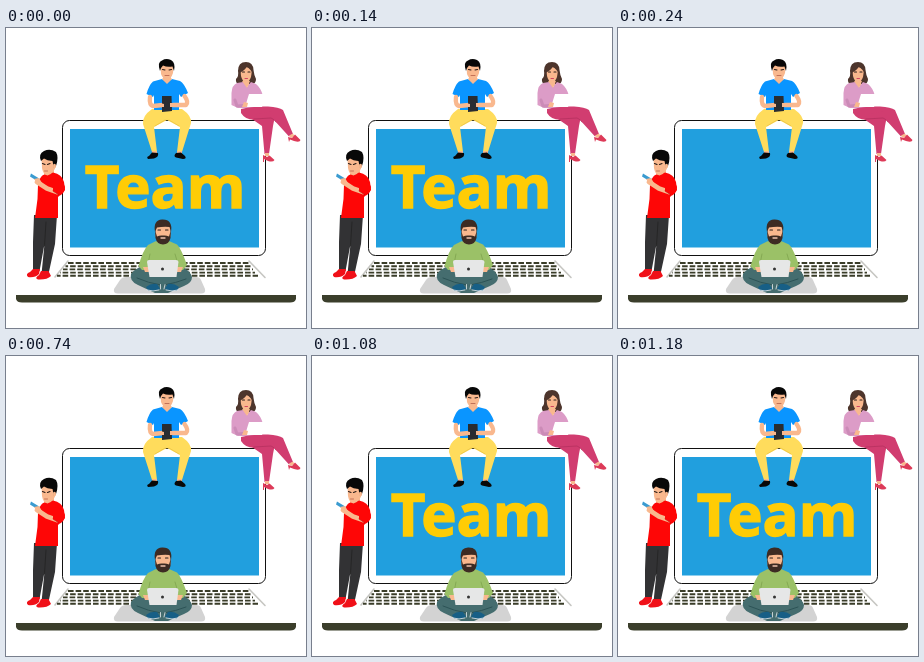
An HTML page for the animation above (1.24 s loop, 300 px wide and 300 px high).

```html
<!DOCTYPE html>
<html lang="en">
<head>
<meta charset="utf-8">
<title>Team</title>
<style>
  html, body { margin: 0; width: 100%; height: 100%; overflow: hidden; background: #fff; }
  svg { display: block; width: 100%; height: 100%; }
  .word {
    font: 700 59.8px "Open Sans", "Noto Sans", sans-serif;
    fill: #ffcc05;
    stroke: #ffcc05;
    stroke-width: 1.4;
    text-anchor: middle;
    animation: blink 1240ms step-end infinite;
  }
  @keyframes blink {
    0% { visibility: visible; }
    19.3548% { visibility: hidden; }
    87.0968%, 100% { visibility: visible; }
  }
  .skin { fill: #f9b88e; }
  .ink { fill: #080808; }
  .line { fill: none; stroke-linecap: round; stroke-linejoin: round; }
  .arm { stroke: #f9b88e; }
  .brow { stroke: #2b1d18; stroke-width: 1.1; }
  .mouth { stroke: #b5604a; stroke-width: .8; }
  .keys path { fill: none; stroke: #3a3d29; stroke-width: 1.9; stroke-dasharray: 5.6 2; }
</style>
</head>
<body>
<svg viewBox="0 0 300 300">
  <g id="laptop">
    <rect x="56.5" y="92.5" width="203" height="135" rx="7" fill="#fff" stroke="#111"/>
    <rect x="64" y="101" width="189" height="118.5" fill="#219fde"/>
    <path class="line" d="M62 233L49 249M243 233L259 249.5" stroke="#c6c6c2" stroke-width="1.6"/>
    <g class="keys">
      <path d="M62 235H243"/>
      <path d="M59.5 238.2H245" stroke-dashoffset="3"/>
      <path d="M57 241.4H247" stroke-dashoffset="1"/>
      <path d="M54 244.6H249" stroke-dashoffset="5"/>
      <path d="M51 247.8H252" stroke-dashoffset="2"/>
    </g>
    <path d="M120 249H190Q194 249 195 252L199 261Q200 265.500 195 265.500H112Q107 265.500 108 261L114 252Q116 249 120 249Z" fill="#d3d3d3"/>
    <path d="M10 267H290V271Q289 274.500 284 274.500H16Q11 274.500 10 271Z" fill="#3b3e2b"/>
  </g>

  <text class="word" x="159.1" y="179.700">Team</text>

  <g id="reader">
    <path d="M146 81H176Q186 88 185 95L176 124H171L174 99L161 92L148 99L151 124H146L137 96Q136 88 146 81Z" fill="#ffdc5c"/>
    <path class="line" d="M149 98L159 92M173 98L163 92" stroke="#e5bd3c" stroke-width=".6"/>
    <path class="skin" d="M146 123H151V126H146ZM171 123H176V126H171Z"/>
    <path class="ink" d="M146 124.500L152 125Q153 129 148 130.500L142 131Q140 129 143 128ZM170 125L175 124.500L179 128Q181 131 177 131L170 129.500Q167 128 170 125Z"/>
    <path class="skin" d="M157 45H165V54H157Z"/>
    <path d="M156 51L161 55L166 51L174 53Q178 55 182 65L175 69L173 66V82H148V67L147 69L140.500 66Q143 57 147 53.500Z" fill="#0a95ff"/>
    <path class="skin" d="M156 51L161 56L166 51L164 49H158Z"/>
    <path class="line arm" d="M144 69Q143 77 147 78L157 77M178.500 68Q183 74 180 77L167 77" stroke-width="4.400"/>
    <path d="M156 68H165.500L166 83L156 84Z" fill="#292c31"/>
    <path class="skin" d="M154 75L158 76V79H154ZM164 75H168V79H164Z"/>
    <path class="skin" d="M154.500 38Q157 34 161 34Q167 35 167.500 40L167 45Q165 51.500 161 51.500Q157 51.500 155 46Z"/>
    <path class="ink" d="M154 43Q151 34 156 32.500Q160 30 165 32Q170 35 168 43L166.500 38.500Q161 39.500 157 37.500L155 40Z"/>
    <path class="line brow" d="M156.500 41.500L159 42M163 42L165.500 41.500"/>
    <path class="line mouth" d="M159 47.500H163"/>
  </g>

  <g id="sitter">
    <path d="M232 43Q232 34 240 34Q247 34 247.500 42Q248 47 250 51Q250 57 244 56L236 56Q229 57 230 51Q233 48 232 43Z" fill="#4d352c"/>
    <path class="skin" d="M237 48H243V58H237Z"/>
    <path d="M231 55L237 54L241 59L245 54L250 56Q255 60 257 68L254 80H232L225.500 77V65Q226 57 231 55Z" fill="#dc9cc7"/>
    <path class="skin" d="M236 53L241 60L244 53Z"/>
    <path class="skin" d="M234.500 42Q239 36 246 42L245 49Q243 54.500 240 54.500Q236 53 235 48Z"/>
    <path d="M233.500 45Q233 36 240 35Q247 36 246.500 45Q245 42 241 38.500Q239 42 233.500 45Z" fill="#4d352c"/>
    <path class="line brow" d="M236.500 44H238.500M242 44H244"/>
    <path class="line" d="M239 50.500H241.500" stroke="#cf385c" stroke-width=".9"/>
    <path d="M235 81Q246 78 262 78.500Q273 79 277 82L287 106L283 108.500L268 92L251 91.500Q240 93 235 85Z" fill="#d13d70"/>
    <path d="M246 87L265 83Q270 87 267 98L263 126H258.500L256 98L246 91Z" fill="#d13d70"/>
    <path class="line" d="M248 91L265 90Q268 91 270 94" stroke="#ad2d5a" stroke-width=".6"/>
    <path class="skin" d="M259 125H263V128H259ZM283 107.500L287 105.500L288.500 108L285 110Z"/>
    <path d="M257 127L261 129L263.500 127.500L268.500 132Q267 134.500 262 133L258 131V134H257ZM282 109L286 110L289 106.500L294.500 112Q294 115 288 113L284 111.500L283 114Z" fill="#dd3a58"/>
    <path d="M243 66H259L256 79H239Z" fill="#fff"/>
    <path class="line" d="M229 72L231 78L238 77.500" stroke="#cb8bb7" stroke-width="3"/>
    <path class="skin" d="M238 74L242 75L241 79H236Z"/>
  </g>

  <g id="leaner">
    <path d="M28 187H51L49 216L42.500 246H35.500L38.500 216L33.500 243H27L27 214Z" fill="#323234"/>
    <path class="line" d="M40 194L38.500 218" stroke="#222" stroke-width=".8"/>
    <path d="M27 241H34L33 246Q29 250 22 249Q19 246 24 244ZM35 243L42.500 243L45 248Q41 252 32 251.500Q28 250 33 247Z" fill="#f01018"/>
    <path class="skin" d="M38 138H48V149H38Z"/>
    <path d="M37 147L47 144.500Q56 146 58 154L59 162L52 169V190H29L31.500 171L32 157Q33 150 37 147Z" fill="#fe0606"/>
    <path class="line arm" d="M51 164L41 160.500L31 154" stroke-width="4.800"/>
    <path d="M47 151Q56 151 59 159Q59 165 54 167.500L47 163Z" fill="#fe0606"/>
    <path class="line" d="M47 163L53 167" stroke="#c90d12" stroke-width=".7"/>
    <path d="M25 145.500L34 151L32 153.500L24 148.500Z" fill="#3a9bd0"/>
    <path class="skin" d="M28 151L33 150L36 155H31Z"/>
    <path class="skin" d="M35.500 130L48 128L50 137Q48 146 41.500 147.500Q37 146.500 36 140Z"/>
    <path class="ink" d="M35 133Q32 126 38 123Q44 120 50 124Q53 129 50 138L48 140L46.500 133Q41 132.500 38 130.500Z"/>
    <path class="line brow" d="M36.500 135.500L39 136.500M41.500 136.500L44 135.500"/>
    <path class="line mouth" d="M38.500 143H41.500"/>
    <ellipse class="skin" cx="48.500" cy="138" rx="1.500" ry="2.300"/>
  </g>

  <g id="coder">
    <path d="M138 238H174Q184 242 186 249Q186 255 178 258L162 265H149L132 257Q123 253 125 246Q129 240 138 238Z" fill="#456d6f"/>
    <path class="line" d="M131 250Q142 255 155 257M180 251Q170 255 158 257" stroke="#2c5356" stroke-width="1"/>
    <path class="skin" d="M151 210H163V219H151Z"/>
    <path d="M150 213Q156 219 163 213L171 216.500Q175 220 181 237L177 242H136L132.500 238Q137 222 142 217Z" fill="#9bc167"/>
    <path class="line" d="M144 226L142 236M169 226L172 236" stroke="#7fa44f" stroke-width=".8"/>
    <path class="skin" d="M137 239L144 239V244H139ZM170 239L177 239L175 244H170Z"/>
    <path d="M143 232H170Q172.500 232 172.500 234L170.500 249H143.500L141 234Q141 232 143 232Z" fill="#e6e7e7"/>
    <circle cx="156.500" cy="241" r="1.500" fill="#333"/>
    <path d="M140 259Q145 255 151 256L154 260.500Q151 264 142 262.500ZM173 259Q168 255 162 256L159 260.500Q162 264 171 262.500Z" fill="#175f86"/>
    <path class="line" d="M141 262Q147 264 153 262M172 262Q166 264 160 262M154.500 256.500V261M159 256.500L158 261" stroke="#e7edef" stroke-width=".8"/>
    <path class="skin" d="M149.500 198H164.500V208Q163 215 157 215Q151 215 149.500 208Z"/>
    <path d="M149 204Q147 192 156 191.500Q167 191 165 204L163.500 199Q157 198.500 151 199.500Z" fill="#3d2b23"/>
    <path d="M149 202L151 208.500Q154 207 157 207.500Q160 207 163 208.500L165 202L164.500 210Q163 216.500 157 216.500Q151 216.500 149.500 210Z" fill="#3d2b23"/>
    <path class="line brow" d="M152 202H154.500M159.500 202H162"/>
    <path class="line" d="M155 210H159" stroke="#f0c4ae" stroke-width="1.300"/>
  </g>
</svg>
</body>
</html>
```
